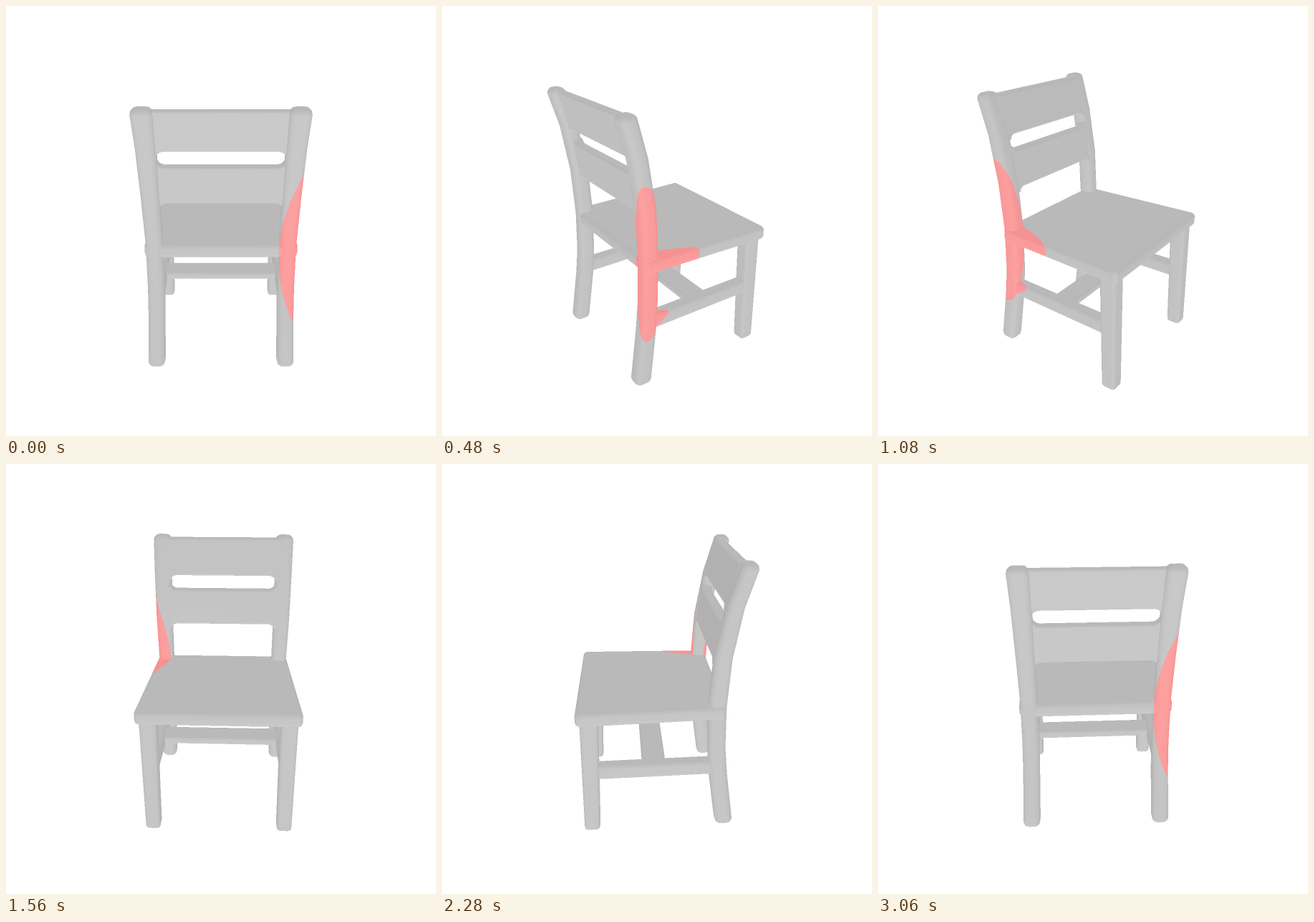
Recreate the animation shown at these times as an HTML page with a canvas. Size 600 by 600 pixels, loop 3120 ms.

```html
<!DOCTYPE html>
<html lang="en">
<head>
<meta charset="utf-8">
<title>Turning chair</title>
<style>
  html, body { margin: 0; width: 100%; height: 100%; overflow: hidden; background: #fff; }
  canvas { display: block; width: 600px; height: 600px; }
</style>
</head>
<body>
<canvas id="stage" width="600" height="600"></canvas>
<script>
const SIZE = 600, SCALE = 2, N = SIZE * SCALE;
const FRAMES = 52, FRAME_MS = 60, STEP = 7 * Math.PI / 180;
const DIST = 724;                       // camera distance and focal length
const TILT = 25 * Math.PI / 180, CT = Math.cos(TILT), ST = Math.sin(TILT);
const LIGHT = { y: -0.5, z: 0.87 };
const PATCH = { c: [307, -5.5, 117], r: 237 };   // sphere that colours the joint

const verts = [], normals = [], tris = [];

// Sweeps a rounded rectangle along one axis (0 x, 1 y, 2 z).
// Ring: [t, centre u, centre v, half u, half v]; u and v are the next two axes.
function sweep(axis, round, rings, lean = 0) {
  const caps = [90, 60, 30, 0].map(d => d * Math.PI / 180);
  const first = rings[0], last = rings[rings.length - 1];
  const all = [
    ...caps.map(f => [first[0] + round * (1 - Math.sin(f)), first, Math.cos(f)]),
    ...rings.slice(1, -1).map(r => [r[0], r, 1]),
    ...caps.reverse().map(f => [last[0] - round * (1 - Math.sin(f)), last, Math.cos(f)])
  ];
  const base = verts.length, count = 20;
  const add = (t, u, v) => {
    const p = [];
    p[axis] = t;
    p[(axis + 1) % 3] = u;
    p[(axis + 2) % 3] = v;
    normals.push([0, 0, 0]);
    return verts.push(p) - 1;
  };
  for (const [t, [, cu, cv, hu, hv], k] of all) {
    for (let j = 0; j < count; j++) {
      const corner = Math.floor(j / 5), a = (corner + (j % 5) / 4) * Math.PI / 2;
      const su = corner === 0 || corner === 3 ? 1 : -1, sv = corner < 2 ? 1 : -1;
      const du = su * (hu - round) + round * k * Math.cos(a);
      const dv = sv * (hv - round) + round * k * Math.sin(a);
      add(t, cu + du, cv + dv + lean * du);
    }
  }
  for (let k = 0; k < all.length - 1; k++) {
    for (let j = 0; j < count; j++) {
      const a = base + k * count + j, b = base + k * count + (j + 1) % count;
      tris.push([a, b, b + count], [a, b + count, a + count]);
    }
  }
  const start = add(all[0][0], first[1], first[2]);
  const end = add(all[all.length - 1][0], last[1], last[2]);
  const tail = base + (all.length - 1) * count;
  for (let j = 0; j < count; j++) {
    const n = (j + 1) % count;
    tris.push([start, base + n, base + j], [end, tail + j, tail + n]);
  }
}

// Back slat that widens where it meets the posts: downwards, and upwards by the share `up`.
function slat(y, z, half, thick, lean, up) {
  const flare = [[82, 6], [75, 6], [73, 3], [70.5, 1.2], [67, 0]];
  const ring = (x, f) => {
    const shift = f * (up - 1) / 2;
    return [x, y + shift, z + lean * shift, half + f * (up + 1) / 2, thick];
  };
  const left = flare.map(([x, f]) => ring(-x, f));
  const right = flare.map(([x, f]) => ring(x, f)).reverse();
  sweep(0, 3, [...left, ...right], lean);
}

for (const s of [-1, 1]) {
  sweep(1, 8, [                                    // rear leg and post
    [-179, 85, 88.5 * s, 12, 11.5],
    [-99, 75, 86 * s, 12, 11],
    [-60, 71.5, 85 * s, 11.5, 11],
    [0, 70, 84.5 * s, 11.5, 10.8],
    [66, 73.5, 85.5 * s, 11, 11.5],
    [129, 84, 86 * s, 10.5, 12],
    [181, 97, 86.5 * s, 10.5, 12.5]
  ]);
  sweep(1, 5, [[-179, -94.5, 89 * s, 10.5, 10], [-4, -91, 88 * s, 11.5, 11]]);   // front leg
  sweep(2, 6, [[-92, 88 * s, -87.5, 8, 11.5], [76, 86 * s, -87.5, 8, 11.5]]);    // side rail
}
sweep(0, 4, [[-84, -86, -10, 6, 15.5], [84, -86, -10, 6, 15.5]]);                // cross rail
sweep(2, 6, [[-107.5, 0, -5.75, 103.5, 9.75], [80, 0, -5.75, 97, 9.75]]);        // seat
slat(152, 87.5, 25, 7, 0.26, 0);
slat(83, 73.5, 24.5, 7, 0.14, 1);

// Smooth normals, weighted by area.
for (const [a, b, c] of tris) {
  const p = verts[a], q = verts[b], r = verts[c];
  const e = q.map((v, i) => v - p[i]), f = r.map((v, i) => v - p[i]);
  const n = [e[1] * f[2] - e[2] * f[1], e[2] * f[0] - e[0] * f[2], e[0] * f[1] - e[1] * f[0]];
  for (const v of [a, b, c]) for (let i = 0; i < 3; i++) normals[v][i] += n[i];
}
for (const n of normals) {
  const len = Math.hypot(...n) || 1;
  for (let i = 0; i < 3; i++) n[i] /= len;
}

const stage = document.getElementById('stage').getContext('2d');
const buffer = document.createElement('canvas');
buffer.width = buffer.height = N;
const bufferCtx = buffer.getContext('2d');
const image = bufferCtx.createImageData(N, N);
const pixels = new Uint32Array(image.data.buffer);
const near = new Float32Array(N * N), tone = new Float32Array(N * N);
const count = verts.length;
const px = new Float64Array(count), py = new Float64Array(count);
const inv = new Float64Array(count), lit = new Float64Array(count);

// Turns a chair point and returns it as right, up, towards the camera.
function toCamera([x, y, z], cos, sin) {
  const rx = x * cos - z * sin, rz = x * sin + z * cos;
  return [rx, y * CT - rz * ST, y * ST + rz * CT];
}

function fillTriangle(a, b, c) {
  const x0 = px[a], y0 = py[a];
  const x1 = px[b] - x0, y1 = py[b] - y0, x2 = px[c] - x0, y2 = py[c] - y0;
  const area = x1 * y2 - x2 * y1;
  if (area > -1e-6) return;
  const slope = q => {
    const d1 = q[b] - q[a], d2 = q[c] - q[a];
    return [(d1 * y2 - d2 * y1) / area, (d2 * x1 - d1 * x2) / area];
  };
  const [ix, iy] = slope(inv), [lx, ly] = slope(lit);
  const edges = [[a, b], [b, c], [c, a]];
  const top = Math.max(0, Math.ceil(Math.min(y0, py[b], py[c]) - 0.5));
  const bottom = Math.min(N - 1, Math.floor(Math.max(y0, py[b], py[c]) - 0.5));
  for (let y = top; y <= bottom; y++) {
    const yc = y + 0.5;
    let lo = 0, hi = N;
    for (const [i, j] of edges) {
      const dy = py[j] - py[i];
      if (dy === 0) continue;
      const x = px[i] + (px[j] - px[i]) * (yc - py[i]) / dy;
      if (dy > 0) { if (x > lo) lo = x; } else if (x < hi) hi = x;
    }
    const to = Math.min(N - 1, Math.floor(hi - 0.5));
    for (let x = Math.ceil(lo - 0.5); x <= to; x++) {
      const dx = x + 0.5 - x0, dy = yc - y0, at = y * N + x;
      const depth = inv[a] + ix * dx + iy * dy;
      if (depth > near[at]) {
        near[at] = depth;
        tone[at] = lit[a] + lx * dx + ly * dy;
      }
    }
  }
}

function render(frame) {
  const cos = Math.cos(frame * STEP), sin = Math.sin(frame * STEP);
  for (let i = 0; i < count; i++) {
    const [x, up, w] = toCamera(verts[i], cos, sin), n = normals[i];
    inv[i] = 1 / (DIST - w);
    px[i] = N / 2 + x * DIST * SCALE * inv[i];
    py[i] = N / 2 - up * DIST * SCALE * inv[i];
    const nz = n[0] * sin + n[2] * cos, rise = Math.max(0, n[1]);
    lit[i] = 177 + 25 * Math.max(0, n[1] * LIGHT.y + nz * LIGHT.z) + 9 * rise * rise;
  }
  near.fill(0);
  for (const [a, b, c] of tris) fillTriangle(a, b, c);

  const [cx, cy, cw] = toCamera(PATCH.c, cos, sin), r2 = PATCH.r ** 2;
  for (let y = 0, at = 0; y < N; y++) {
    for (let x = 0; x < N; x++, at++) {
      if (!near[at]) { pixels[at] = 0xffffffff; continue; }
      const d = 1 / near[at], k = d / (DIST * SCALE);
      const dx = (x + 0.5 - N / 2) * k - cx, dy = (N / 2 - y - 0.5) * k - cy, dw = DIST - d - cw;
      let red = tone[at], rest = red;
      if (dx * dx + dy * dy + dw * dw < r2) {
        rest = red - 39;
        red = Math.min(255, red * 0.6 + 134);
      }
      pixels[at] = (255 << 24 | rest << 16 | rest << 8 | red) >>> 0;
    }
  }
  bufferCtx.putImageData(image, 0, 0);
  stage.drawImage(buffer, 0, 0, SIZE, SIZE);
}

const begin = performance.now();
let shown = -1;
function tick() {
  const frame = Math.floor((performance.now() - begin) / FRAME_MS) % FRAMES;
  if (frame !== shown) render(shown = frame);
  requestAnimationFrame(tick);
}
tick();
</script>
</body>
</html>
```
